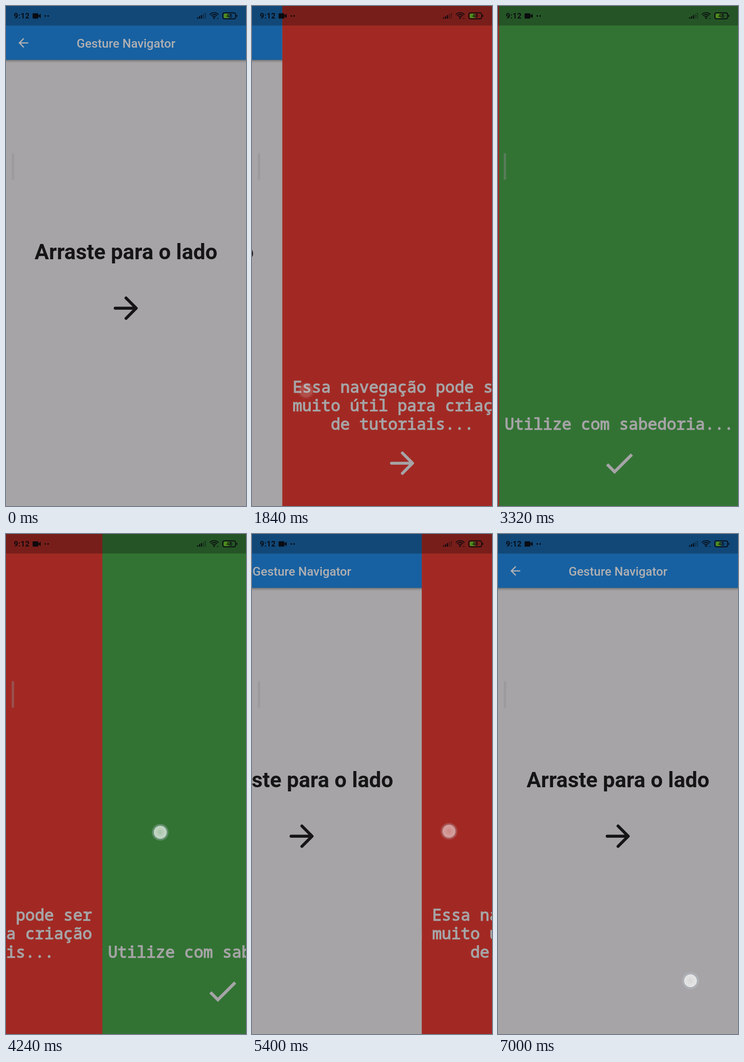
Recreate the animation shown at these times as an HTML page with a canvas. Size 519x1080 px, loop 7.04 s.

```html
<!DOCTYPE html>
<html lang="pt">
<head>
<meta charset="utf-8">
<title>Gesture Navigator</title>
<style>
  html, body { margin: 0; width: 100%; height: 100%; overflow: hidden; background: #a6a4a6; }
  canvas { display: block; width: 519px; height: 1080px; }
</style>
</head>
<body>
<canvas id="stage" width="519" height="1080"></canvas>
<script>
const W = 519, H = 1080, LOOP = 7040, MID = W / 2;
const STATUS_H = 42.3, BAR_BOTTOM = 116.3;
const ctx = document.getElementById('stage').getContext('2d');
const PALE = '#a6a4a6', INK = '#151516', DARK = 'rgba(8,8,12,.92)';
const SLOP = 24, POWER = 1.3, FADE = 210;

// Finger swipes: times in ms, path, and the page offsets they lead between
const swipes = [
  { start: 1404, end: 1684, x0: 430, x1: 117, y0: 850, y1: 831, from: 0, to: W },
  { start: 2600, end: 2840, x0: 430, x1: 86, y0: 650, y1: 643, from: W, to: 2 * W },
  { start: 4040, end: 4300, x0: 101, x1: 426, y0: 650, y1: 642, from: 2 * W, to: W },
  { start: 5095, end: 5355, x0: 101, x1: 426, y0: 650, y1: 642, from: W, to: 0 }
];

const checkIcon = new Path2D('M9 16.17L4.83 12l-1.42 1.41L9 19 21 7l-1.41-1.41z');
const backIcon = new Path2D('M20 11H7.83l5.59-5.59L12 4l-8 8 8 8 1.41-1.41L7.83 13H20v-2z');

function fingerAt(s, t) {
  const u = Math.min(1, Math.max(0, (t - s.start) / (s.end - s.start))) ** POWER;
  return { x: s.x0 + (s.x1 - s.x0) * u, y: s.y0 + (s.y1 - s.y0) * u };
}

function dragged(s, t) {
  const d = s.x0 - fingerAt(s, t).x;
  return s.from + Math.sign(d) * Math.max(0, Math.abs(d) - SLOP);
}

// Overdamped spring: mass 0.5, stiffness 100, damping ratio 1.1
function settle(s, t) {
  const w = Math.sqrt(200), k = Math.sqrt(1.1 * 1.1 - 1);
  const r1 = -w * (1.1 - k), r2 = -w * (1.1 + k);
  const x = dragged(s, s.end) - s.to;
  const v = POWER * (s.x0 - s.x1) / (s.end - s.start) * 1000;
  const a = (v - r2 * x) / (r1 - r2), sec = (t - s.end) / 1000;
  const d = a * Math.exp(r1 * sec) + (x - a) * Math.exp(r2 * sec);
  return Math.abs(d) < 0.4 ? s.to : s.to + d;
}

function scrollAt(t) {
  const s = swipes.filter(s => t >= s.start).pop();
  if (!s) return 0;
  return t < s.end ? dragged(s, t) : settle(s, t);
}

function rect(color, x, y, w, h, r = 0) {
  ctx.fillStyle = color;
  ctx.beginPath();
  ctx.roundRect(x, y, w, h, r);
  ctx.fill();
}

function text(str, x, y, font, color, align = 'center', bolden = 0) {
  ctx.font = font;
  ctx.textAlign = align;
  ctx.fillStyle = ctx.strokeStyle = color;
  ctx.fillText(str, x, y);
  if (bolden) {
    ctx.lineWidth = bolden;
    ctx.lineJoin = 'miter';
    ctx.strokeText(str, x, y);
  }
}

function mono(str, y) {
  text(str, MID, y, '34.36px "Noto Sans Mono", monospace', PALE, 'center', 1.4);
}

function icon(path, x, y, scale, color) {
  ctx.save();
  ctx.translate(x, y);
  ctx.scale(scale, scale);
  ctx.fillStyle = color;
  ctx.fill(path);
  ctx.restore();
}

function arrow(y, color) {
  ctx.strokeStyle = color;
  ctx.lineWidth = 6.4;
  ctx.lineCap = ctx.lineJoin = 'round';
  ctx.beginPath();
  ctx.moveTo(236.2, y);
  ctx.lineTo(281, y);
  ctx.moveTo(259.6, y - 22);
  ctx.lineTo(281.6, y);
  ctx.lineTo(259.6, y + 22);
  ctx.stroke();
}

function homePage() {
  rect(PALE, 0, 0, W, H);
  const shade = ctx.createLinearGradient(0, BAR_BOTTOM, 0, BAR_BOTTOM + 7);
  shade.addColorStop(0, 'rgba(0,0,0,.34)');
  shade.addColorStop(0.4, 'rgba(0,0,0,.12)');
  shade.addColorStop(1, 'rgba(0,0,0,0)');
  rect(shade, 0, BAR_BOTTOM - 1, W, 8);
  rect('#1761a2', 0, 0, W, BAR_BOTTOM);
  icon(backIcon, 21.7, 63.9, 1.322, '#b0b0b2');
  text('Gesture Navigator', MID, 90, '500 26.4px Roboto, sans-serif', '#b0b0b2');
  text('Arraste para o lado', MID, 547, 'bold 46.25px Roboto, sans-serif', INK);
  arrow(652.7, INK);
}

function tipPage() {
  rect('#a22923', 0, 0, W, H);
  mono('Essa navegação pode ser', 835);
  mono('muito útil para criação', 874.8);
  mono('de tutoriais...', 914.5);
  arrow(987.6, PALE);
}

function lastPage() {
  rect('#327334', 0, 0, W, H);
  mono('Utilize com sabedoria...', 914.5);
  icon(checkIcon, 219.9, 948, 3.304, PALE);
}

function statusBar() {
  rect('rgba(0,0,0,.26)', 0, 0, W, STATUS_H);
  ctx.letterSpacing = '0.5px';
  text('9:12', 17, 27.3, 'bold 16px Roboto, sans-serif', DARK, 'left');
  ctx.letterSpacing = '0px';

  rect(DARK, 57.5, 15.8, 12.5, 11.4, 1.5);
  ctx.beginPath();
  ctx.moveTo(69, 21.5);
  ctx.lineTo(75, 16.5);
  ctx.lineTo(75, 26.5);
  ctx.fill();
  rect(DARK, 83.2, 19.8, 3.4, 3.4, 1.7);
  rect(DARK, 89.4, 19.8, 3.4, 3.4, 1.7);

  for (let i = 0; i < 5; i++) {
    const h = 3 + i * 2.5;
    rect(i < 3 ? DARK : 'rgba(8,8,12,.35)', 413 + i * 4.2, 27.5 - h, 2.6, h, 0.8);
  }

  ctx.strokeStyle = DARK;
  ctx.lineWidth = 1.9;
  ctx.lineCap = 'butt';
  for (const r of [4.8, 8.7, 12.6]) {
    ctx.beginPath();
    ctx.arc(450, 27, r, -Math.PI * 0.77, -Math.PI * 0.23);
    ctx.stroke();
  }
  rect(DARK, 448.2, 24.4, 3.6, 3.6, 1.8);
  rect('rgba(8,8,12,.6)', 456, 25.5, 1.2, 3);
  rect('rgba(8,8,12,.6)', 458.4, 25.5, 1.2, 3);

  rect('#4f8c1d', 471, 16.6, 11.5, 9.4, 1.5);
  ctx.strokeStyle = DARK;
  ctx.lineWidth = 2;
  ctx.beginPath();
  ctx.roundRect(468.8, 14.8, 27.8, 13, 3.5);
  ctx.stroke();
  rect(DARK, 498.4, 19, 1.8, 4.6, 0.8);
  text('48', 482.7, 25.4, '500 11px Roboto, sans-serif', DARK);
}

function touch(x, y, alpha) {
  const r = 19, dot = ctx.createRadialGradient(x, y, 0, x, y, r);
  dot.addColorStop(0, 'rgba(255,255,255,.57)');
  dot.addColorStop(0.5, 'rgba(255,255,255,.69)');
  dot.addColorStop(0.72, 'rgba(255,255,255,.69)');
  dot.addColorStop(0.77, 'rgba(125,145,170,.5)');
  dot.addColorStop(0.83, 'rgba(205,212,225,.36)');
  dot.addColorStop(1, 'rgba(215,222,235,0)');
  ctx.globalAlpha = alpha;
  rect(dot, x - r, y - r, 2 * r, 2 * r, r);
  ctx.globalAlpha = 1;
}

function draw(t) {
  const offset = scrollAt(t);
  [homePage, tipPage, lastPage].forEach((page, i) => {
    const x = i * W - offset;
    if (Math.abs(x) >= W) return;
    ctx.save();
    ctx.translate(x, 0);
    page();
    ctx.restore();
  });
  statusBar();
  rect('rgba(140,140,143,.42)', 12.4, 317.5, 5, 58, 2.5);

  for (const s of swipes) {
    if (t < s.start || t >= s.end + FADE) continue;
    const p = fingerAt(s, t);
    touch(p.x, p.y, Math.min(1, 1 - (t - s.end) / FADE));
  }
  if (t >= 7000) touch(416.3, 965, 1);
}

const begin = performance.now();
function tick() {
  draw((performance.now() - begin) % LOOP);
  requestAnimationFrame(tick);
}
tick();
</script>
</body>
</html>
```
